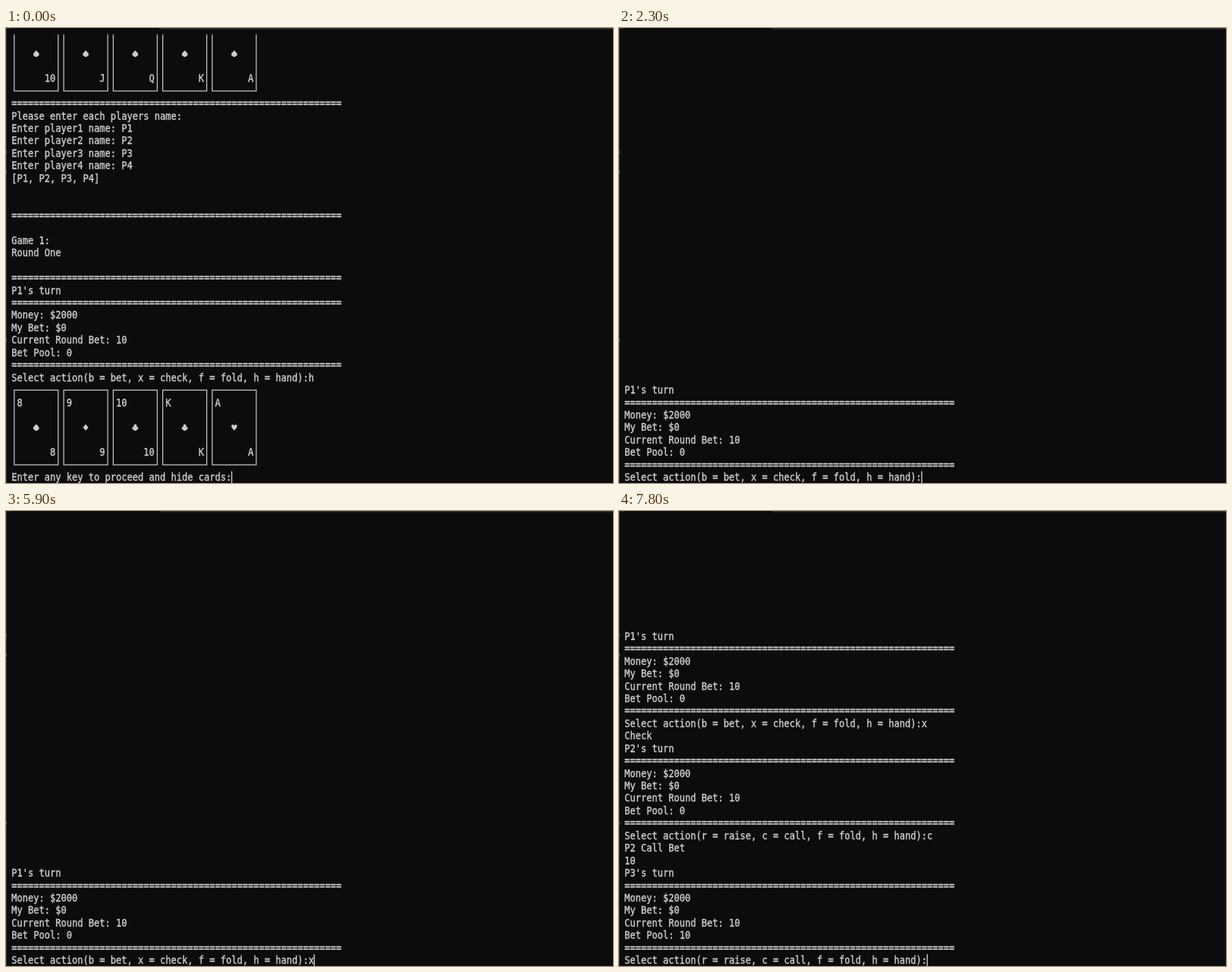
Recreate the animation shown at these times as an HTML page with a canvas. Size 800 by 600 pixels, loop 8 s.

```html
<!DOCTYPE html>
<html lang="en">
<head>
<meta charset="utf-8">
<title>Poker in a terminal</title>
<style>
  html, body { margin: 0; width: 100%; height: 100%; overflow: hidden; background: #0c0c0c; }
  canvas { display: block; width: 800px; height: 600px; }
</style>
</head>
<body>
<canvas id="stage" width="800" height="600"></canvas>
<script>
const ctx = document.getElementById('stage').getContext('2d');
const LOOP = 8000;
const BACK = '#0c0c0c', INK = '#cccccc';

// Terminal grid, rows counted upwards from the bottom line.
const LEFT = 7.2, COL = 7.25, ROW = 16.433, LAST = 592.5, TOP = 8.5;
const colX = c => LEFT + c * COL;
const rowY = r => LAST - r * ROW;

const FONT = '13.3px "DejaVu Sans Mono", "Noto Sans Mono", monospace';
const RULE = '='.repeat(60);
const BET = 'Select action(b = bet, x = check, f = fold, h = hand):';
const RAISE = 'Select action(r = raise, c = call, f = fold, h = hand):';

const stats = (pool, prompt) => [
  RULE, 'Money: $2000', 'My Bet: $0', 'Current Round Bet: 10',
  'Bet Pool: ' + pool, RULE, prompt
];
const turn = (player, pool, prompt) => [player + "'s turn", ...stats(pool, prompt)];

const dealt = [
  RULE, 'Please enter each players name:',
  ...[1, 2, 3, 4].map(n => `Enter player${n} name: P${n}`),
  '[P1, P2, P3, P4]', '', '', RULE, '', 'Game 1:', 'Round One', '', RULE,
  ...turn('P1', 0, BET + 'h'),
  ...Array(7).fill(''),
  'Enter any key to proceed and hide cards:'
];
const checked = [...turn('P1', 0, BET + 'x'), 'Check'];
const called = [...checked, ...turn('P2', 0, RAISE + 'c'), 'P2 Call Bet', '10'];

const hands = [
  { row: 31, cards: ['10♠', 'J♠', 'Q♠', 'K♠', 'A♠'] },
  { row: 1, cards: ['8♠', '9♦', '10♣', 'K♣', 'A♥'] }
];

// Each scene starts with a visible cursor; "blink" lists when it toggles.
const scenes = [
  { at: 0, lines: dealt, hands, blink: [100, 500, 1000, 1400, 1900] },
  { at: 2300, lines: turn('P1', 0, BET), blink: [2800, 3300, 3700, 4200, 4600, 5100, 5500] },
  { at: 5900, lines: turn('P1', 0, BET + 'x'), blink: [] },
  { at: 6100, lines: [...checked, ...turn('P2', 0, RAISE)], blink: [6600, 7100] },
  { at: 7600, lines: [...checked, ...turn('P2', 0, RAISE + 'c')], blink: [] },
  { at: 7800, lines: [...called, ...turn('P3', 10, RAISE)], blink: [] }
];

// The screen is shown with narrow pixels, so all text shares one aspect.
ctx.font = FONT;
const aspect = COL / ctx.measureText('M').width;

// A hairline outline gives the text its medium weight.
function write(text, col, row) {
  ctx.save();
  ctx.translate(colX(col), rowY(row) + 4.6);
  ctx.scale(aspect, 1);
  ctx.lineWidth = 0.4;
  ctx.fillText(text, 0, 0);
  ctx.strokeText(text, 0, 0);
  ctx.restore();
}

function disc(x, y, r) {
  ctx.moveTo(x + r, y);
  ctx.arc(x, y, r, 0, Math.PI * 2);
}

function stem() {
  ctx.moveTo(0, 0);
  ctx.lineTo(2, 4.2);
  ctx.lineTo(-2, 4.2);
}

const suits = {
  '♠'() {
    ctx.moveTo(0, -4.4);
    ctx.bezierCurveTo(1, -2.8, 3.9, -1.4, 3.9, 1);
    ctx.bezierCurveTo(3.9, 3.6, 1.2, 3.8, 0, 2);
    ctx.bezierCurveTo(-1.2, 3.8, -3.9, 3.6, -3.9, 1);
    ctx.bezierCurveTo(-3.9, -1.4, -1, -2.8, 0, -4.4);
    stem();
  },
  '♥'() {
    ctx.moveTo(0, 4.2);
    ctx.bezierCurveTo(-1, 2, -3.8, 0.6, -3.8, -1.6);
    ctx.bezierCurveTo(-3.8, -4.4, -0.6, -4.6, 0, -2.2);
    ctx.bezierCurveTo(0.6, -4.6, 3.8, -4.4, 3.8, -1.6);
    ctx.bezierCurveTo(3.8, 0.6, 1, 2, 0, 4.2);
  },
  '♦'() {
    ctx.moveTo(0, -4.3);
    ctx.lineTo(3.6, 0);
    ctx.lineTo(0, 4.3);
    ctx.lineTo(-3.6, 0);
  },
  '♣'() {
    disc(0, -2.2, 2.1);
    disc(-2, 1, 2.1);
    disc(2, 1, 2.1);
    stem();
  }
};

function drawCard(card, col, row) {
  const rank = card.slice(0, -1), suit = card.slice(-1);
  const x = colX(col + 0.5);
  ctx.strokeRect(x, rowY(row + 6), COL * 8, ROW * 6);
  write(rank, col + 1, row + 5);
  write(rank, col + 8 - rank.length, row + 1);
  ctx.save();
  ctx.translate(x + COL * 4, rowY(row + 3));
  ctx.beginPath();
  suits[suit]();
  ctx.fill();
  ctx.restore();
}

function drawFrame() {
  ctx.fillStyle = BACK;
  ctx.fillRect(0, 0, 800, 600);
  ctx.fillStyle = '#333333';
  ctx.fillRect(202, 0, 598, 1.5);
  ctx.fillRect(0, 0, 7, 0.8);
  ctx.fillRect(0, 0, 1, 600);
  ctx.fillStyle = '#777777';
  for (const y of [162, 188, 410]) ctx.fillRect(0, y, 1, 4);
}

function draw(t) {
  const scene = scenes.filter(s => s.at <= t).pop();
  const { lines, blink } = scene;
  drawFrame();

  ctx.save();
  ctx.beginPath();
  ctx.rect(0, TOP, 800, 600 - TOP);
  ctx.clip();
  ctx.font = FONT;
  ctx.fillStyle = ctx.strokeStyle = INK;
  ctx.lineWidth = 1.2;
  lines.forEach((text, i) => write(text, 0, lines.length - 1 - i));
  for (const { row, cards } of scene.hands || []) {
    cards.forEach((card, i) => drawCard(card, i * 9, row));
  }
  if (blink.filter(b => b <= t).length % 2 === 0) {
    ctx.fillRect(colX(lines[lines.length - 1].length) - 0.4, 584.5, 1.4, 15.5);
  }
  ctx.restore();
}

const start = performance.now();
function tick() {
  draw((performance.now() - start) % LOOP);
  requestAnimationFrame(tick);
}
tick();
</script>
</body>
</html>
```
